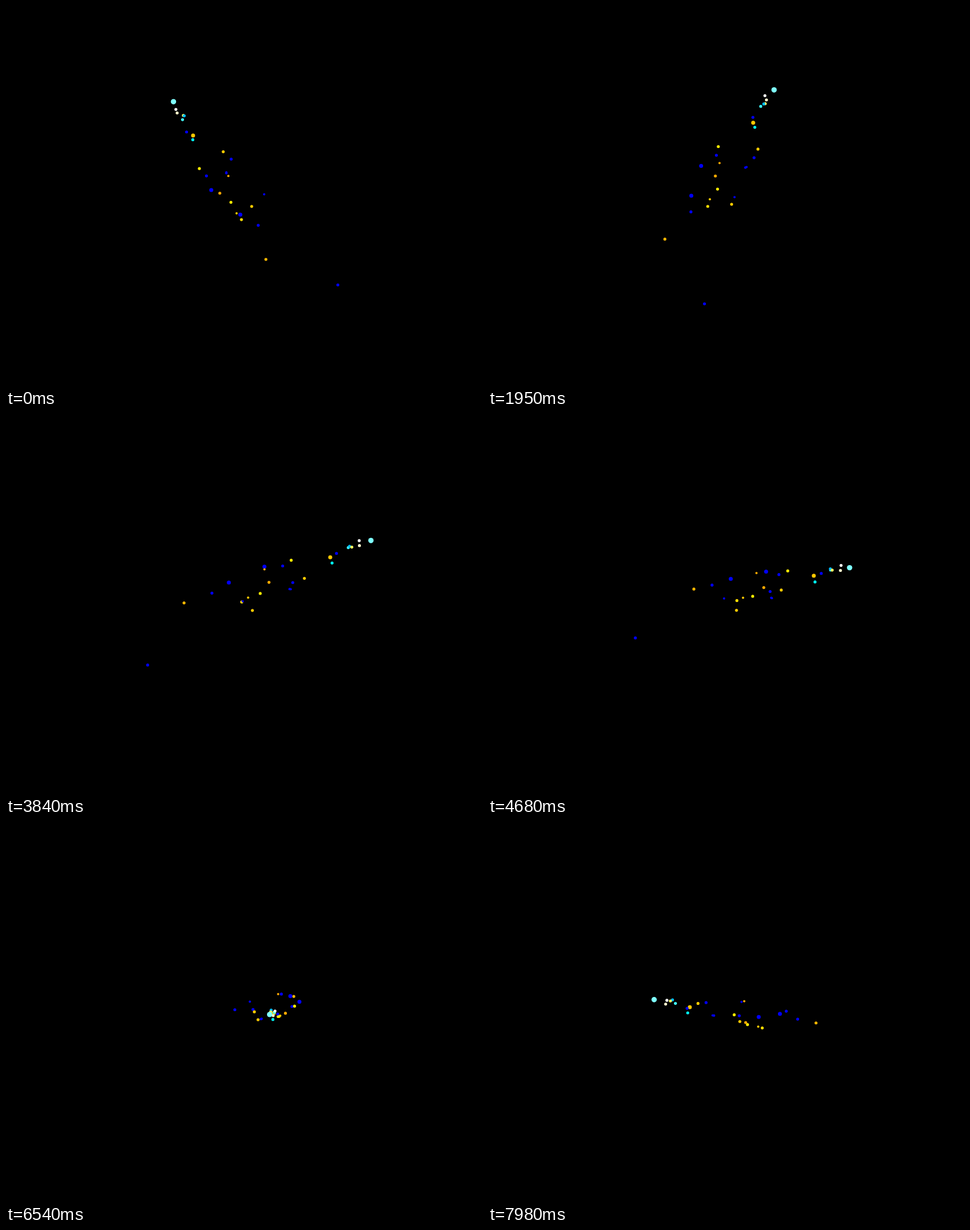
Write an HTML page with a canvas that moves like this. It is 837 by 669 pixels and loops after 8000 ms.

```html
<!DOCTYPE html>
<html lang="en">
<head>
<meta charset="utf-8">
<title>Rotating star cluster</title>
<style>
  html, body { margin: 0; width: 100%; height: 100%; overflow: hidden; background: #000; }
  canvas { display: block; }
</style>
</head>
<body>
<canvas id="stage" width="837" height="669"></canvas>
<script>
const ctx = document.getElementById('stage').getContext('2d');
const LOOP = 8000, STEP = 30;
const CENTER = { x: 436, y: 331 };
const CAMERA = 2784;
const RAD = Math.PI / 180;
const SIN_EL = Math.sin(30 * RAD), COS_EL = Math.cos(30 * RAD);
const TINY = 2, SMALL = 2.6, MEDIUM = 3.5, LARGE = 4.7;

// Each star: across, toward the viewer, height, radius, colour
const stars = [
  [-145.1, -144.6, 109, LARGE, '#7fffff'],
  [-140, -123.6, 104, SMALL, '#ffffff'],
  [-138, -125.8, 95.8, SMALL, '#fffacd'],
  [-126.5, -117.6, 95, SMALL, '#ffff60'],
  [-124.8, -114, 96, SMALL, '#00bfff'],
  [-127.8, -109.4, 90.7, SMALL, '#40ffff'],
  [-120.2, -90, 76, SMALL, '#0000ff'],
  [-108.5, -85, 71.5, MEDIUM, '#ffc800'],
  [-109.3, -88.7, 61, SMALL, '#00ffff'],
  [-54.7, -68.9, 47.3, SMALL, '#ffcc00'],
  [-40.4, -54.4, 40.2, SMALL, '#0000ff'],
  [-95.5, -9.6, 46, SMALL, '#ffee00'],
  [-83, -0.1, 36.6, SMALL, '#0000ff'],
  [-49, -41.4, 18.8, 2.2, '#0000ff'],
  [-49, -43.8, 19.3, TINY, '#0000ff'],
  [-44.5, 11.2, 42.6, TINY, '#ffaa00'],
  [-73.9, 33.9, 27.5, MEDIUM, '#0000ff'],
  [-59.7, 12.6, 9, SMALL, '#ffaa00'],
  [-40.3, 17.3, -6.8, SMALL, '#ffee00'],
  [17.9, 11.1, 5.7, TINY, '#0000ff'],
  [-4, 6.6, -21.4, SMALL, '#ffcc00'],
  [-30.3, 36.9, -17.7, TINY, '#ffcc00'],
  [-23.4, 75.4, 2.8, MEDIUM, '#0000ff'],
  [-21.8, 44.8, -25.7, SMALL, '#ffdd00'],
  [7.3, 89.7, -10.2, SMALL, '#0000ff'],
  [20.2, 145, -44.2, SMALL, '#ffb800'],
  [144.6, 126.2, -108.2, SMALL, '#0000ff']
];

function project([across, toward, height, r, color], angle) {
  const c = Math.cos(angle), s = Math.sin(angle);
  const x = across * c - toward * s;
  const near = across * s + toward * c;
  const depth = near * COS_EL + height * SIN_EL;
  const zoom = CAMERA / (CAMERA - depth);
  return {
    x: CENTER.x + x * zoom,
    y: CENTER.y + (near * SIN_EL - height * COS_EL) * zoom,
    depth, r, color
  };
}

function draw(time) {
  // The view turns one degree per step.
  const angle = Math.floor((time % LOOP) / STEP) * RAD;
  ctx.fillStyle = '#000';
  ctx.fillRect(0, 0, 837, 669);
  const visible = stars.map(star => project(star, angle));
  visible.sort((a, b) => a.depth - b.depth);
  for (const { x, y, r, color } of visible) {
    ctx.fillStyle = color;
    ctx.beginPath();
    ctx.arc(x, y, r, 0, 2 * Math.PI);
    ctx.fill();
  }
}

const start = performance.now();
function tick() {
  draw(performance.now() - start);
  requestAnimationFrame(tick);
}
tick();
</script>
</body>
</html>
```
